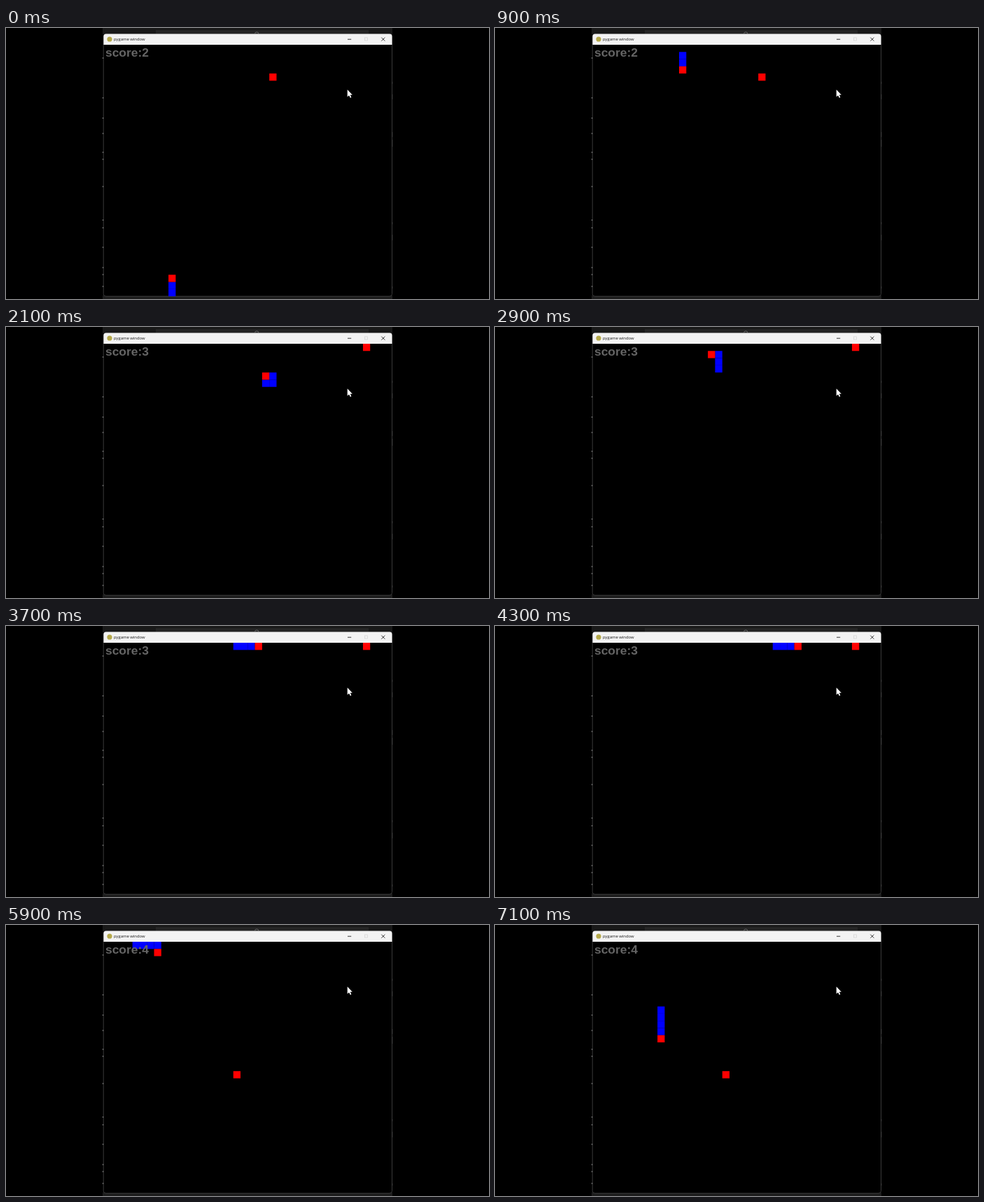
Recreate the animation shown at these times as an HTML page. Size 690 by 388 pixels, loop 7.2 s.

```html
<!DOCTYPE html>
<html lang="en">
<head>
<meta charset="utf-8">
<title>Snake</title>
<style>
  html, body { margin: 0; width: 100%; height: 100%; overflow: hidden; background: #000; }
  svg { display: block; width: 690px; height: 388px; }
  .title { font: 5.9px "Open Sans", "Noto Sans", sans-serif; fill: #1c1c1c; }
  .score { font: bold 17.4px "Liberation Sans", Arial, sans-serif; fill: #646464; }
</style>
</head>
<body>
<svg viewBox="0 0 690 388">
  <rect width="690" height="388"/>
  <!-- desktop behind the window -->
  <rect x="138" width="414" height="9" fill="#191919"/>
  <rect x="214" y="3" width="304" height="6" fill="#242424"/>
  <path d="M355.5 8.5a2.7 2.7 0 1 1 5.4 0" fill="none" stroke="#777" stroke-width=".8"/>
  <rect x="138" y="383" width="414" height="5" fill="#1c1c1c"/>
  <g id="flecks" fill="#8a8a8a"></g>
  <!-- window -->
  <rect x="139.2" y="8.5" width="412.3" height="375.6" rx="3.5" stroke="#484848" stroke-width=".8"/>
  <path d="M139.4 24V12a3.5 3.5 0 0 1 3.5-3.5H548a3.5 3.5 0 0 1 3.5 3.5V24z" fill="#f3f3f3"/>
  <circle cx="148" cy="16" r="3.6" fill="#b5a94a"/>
  <text class="title" x="154" y="18">pygame window</text>
  <g fill="none" stroke="#222" stroke-width=".9">
    <path d="M488 16.2h5.2M536.3 13.6l5 5m0-5l-5 5"/>
    <rect x="512.6" y="13.9" width="4" height="4" stroke="#d2d2d2" stroke-width=".7"/>
  </g>
  <g id="board"></g>
  <text class="score" id="score" x="142" y="41">score:2</text>
  <path d="M487.7 88.2v10.4l2.4-2.2 1.7 3.7 1.6-.8-1.7-3.5h3.1z" fill="#fff"/>
</svg>
<script>
const NS = "http://www.w3.org/2000/svg";
const CELL = 10.29, LEFT = 139.5, TOP = 24;
const COLS = 40, ROWS = 35;
const LOOP = 7200, TICK = 100;
const STEPS_PER_MS = 0.0121, PHASE = 0.85;

const RED = "#f00", BLUE = "#00f";
const DIRS = { U: [0, -1], D: [0, 1], L: [-1, 0], R: [1, 0] };
const START = [9, 34], LEAD = 2;
const MOVES = "U3 R3 D8 R7 D1 R4 U1 L6 U3 L3 U1 R33 D5 R2 D8";

// Each meal takes effect on the step that reaches the food.
const STAGES = [
  { step: 0, score: 2, food: [23, 4] },
  { step: 25, score: 3, food: [36, 0] },
  { step: 60, score: 4, food: [18, 18] }
];

function tracePath() {
  let [x, y] = START;
  const path = [[x, y]];
  for (const move of MOVES.split(" ")) {
    const [dx, dy] = DIRS[move[0]];
    for (let n = +move.slice(1); n > 0; n--) {
      x = (x + dx + COLS) % COLS;
      y = (y + dy + ROWS) % ROWS;
      path.push([x, y]);
    }
  }
  return path;
}

function addRect(parent, x, y, w, h, fill) {
  const rect = document.createElementNS(NS, "rect");
  const attrs = { x, y, width: w, height: h };
  for (const key in attrs) rect.setAttribute(key, attrs[key]);
  if (fill) rect.setAttribute("fill", fill);
  parent.append(rect);
  return rect;
}

function place(rect, [col, row]) {
  rect.setAttribute("x", LEFT + col * CELL);
  rect.setAttribute("y", TOP + row * CELL);
}

const flecks = document.getElementById("flecks");
for (const y of [42, 99, 128, 150, 177, 187, 226, 274, 285, 313, 342, 352, 369])
  addRect(flecks, 138, y, 1, 2);
for (const [y, h] of [[77, 3], [95, 7], [149, 7], [160, 10], [278, 3], [296, 8], [370, 3]])
  addRect(flecks, 551.3, y, 0.8, h);

const board = document.getElementById("board");
const score = document.getElementById("score");
const cell = fill => addRect(board, 0, 0, CELL, CELL, fill);
const path = tracePath();
const food = cell(RED);
const body = Array.from({ length: 4 }, () => cell(BLUE));
const head = cell(RED);

function draw(time) {
  const t = Math.floor((time % LOOP) / TICK) * TICK;
  const step = Math.floor(t * STEPS_PER_MS + PHASE);
  const stage = STAGES.filter(s => s.step <= step).pop();
  const at = step + LEAD;
  place(food, stage.food);
  place(head, path[at]);
  body.forEach((part, i) => {
    const shown = i < stage.score;
    part.style.display = shown ? "" : "none";
    if (shown) place(part, path[at - 1 - i]);
  });
  score.textContent = "score:" + stage.score;
}

const begin = performance.now();
function loop() {
  draw(performance.now() - begin);
  requestAnimationFrame(loop);
}
loop();
</script>
</body>
</html>
```
